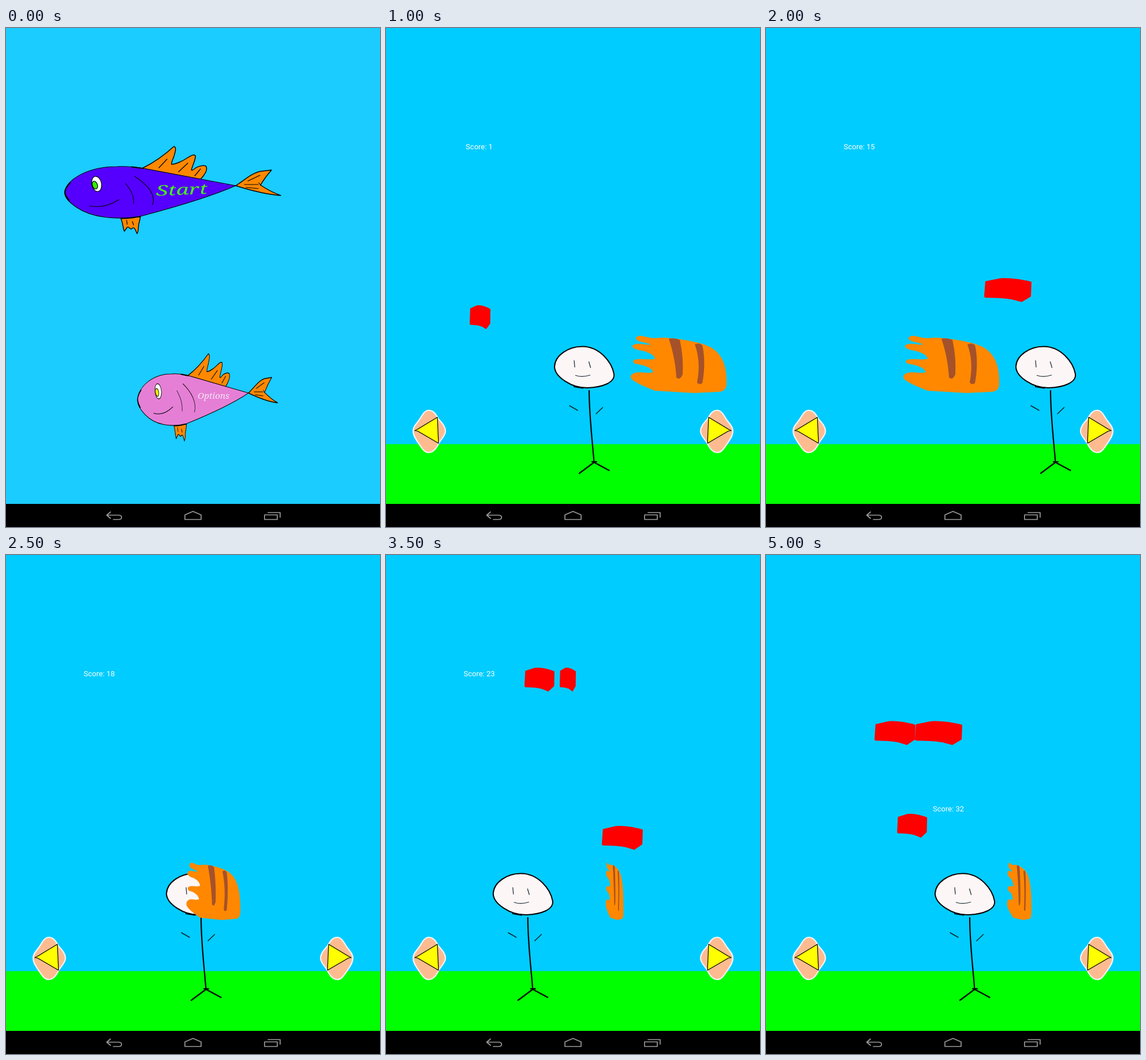
These frames come from a looping animation (648 px wide and 864 px high, 5.5 s). An HTML page with a canvas:

```html
<!DOCTYPE html>
<html lang="en">
<head>
<meta charset="utf-8">
<title>Fish menu and catching game</title>
<style>
html, body { margin: 0; width: 100%; height: 100%; overflow: hidden; background: #000; }
canvas { display: block; width: 648px; height: 864px; }
</style>
</head>
<body>
<canvas id="stage" width="648" height="864"></canvas>
<script>
const ctx = document.getElementById('stage').getContext('2d');
const STEP = 500, STEPS = 11;

function fill(path, color) {
  ctx.fillStyle = color;
  ctx.fill(path);
}
function line(path, width, color = '#000') {
  ctx.lineWidth = width;
  ctx.strokeStyle = color;
  ctx.stroke(path);
}
function rect(x, y, w, h, color) {
  ctx.fillStyle = color;
  ctx.fillRect(x, y, w, h);
}
function disc(x, y, rx, ry, turn, color, edge) {
  const p = new Path2D();
  p.ellipse(x, y, rx, ry, turn, 0, Math.PI * 2);
  fill(p, color);
  if (edge) line(p, edge);
}
function place(dx, dy, draw, sx = 1) {
  ctx.save();
  ctx.translate(dx, dy);
  ctx.scale(sx, 1);
  draw();
  ctx.restore();
}
const shape = d => new Path2D(d);

// Values given on every second step of the game, halfway between on the others
function track(keys, step) {
  const p = (step - 2) / 2, i = Math.floor(p);
  const a = keys[i], b = keys[Math.min(i + 1, keys.length - 1)];
  return a + (b - a) * (p - i);
}

// ---- Navigation bar ----
const navIcons = shape('M181 838L174.500 843.500L181 849M175 843.500H195C202 843.500 202 851 195 851H186' +
  'M310 851V843L324 837L338 843V851Z' +
  'M448 843H470V851H448ZM454 839H475V847');

function navBar() {
  rect(0, 824, 648, 40, '#000');
  line(navIcons, 1.7, '#999');
}

// ---- Menu ----
const fishParts = {
  body: shape('M102 285C104 262 142 240 192 240C208 239 226 241 238 243L398 273C350 294 290 311 233 326C190 333 148 328 123 311C108 301 101 293 102 285Z'),
  dorsal: shape('M236 243C258 232 278 217 291 205C296 207 293 215 291 222C289 228 286 233 287 236C293 236 305 231 314 225C320 221 326 218 328 221C329 227 324 236 322 243C320 248 323 247 329 242C336 238 345 237 347 240C349 246 346 250 342 256L337 262Z'),
  belly: shape('M199 330C203 338 202 345 205 352L210 345C213 343 215 349 217 348C220 345 222 345 224 349L227 356C231 350 228 343 231 336L233 326C222 329 210 330 199 330Z'),
  tail: shape('M398 273C415 262 428 250 442 248L460 246C452 255 445 265 441 272C453 280 465 286 476 290C450 288 420 280 398 273Z'),
  marks: shape('M279 227L265 242M315 234L299 249M337 244L327 256M209 333L210 340M219 335L221 341M419 265L440 255M413 271H437M416 276L437 278M441 272L438 268'),
  face: shape('M145 308C165 312 182 306 196 297M207 269C217 282 222 290 221 304M223 257C247 272 260 290 254 306'),
  lips: shape('M111 268C105 274 102 280 102 285C103 290 105 294 109 298M218 240.500L237 243')
};

function fish(color, pupil) {
  const f = fishParts;
  for (const part of [f.dorsal, f.belly, f.tail]) {
    fill(part, '#ff8800');
    line(part, 1.4);
  }
  fill(f.body, color);
  line(f.body, 1.1);
  line(f.marks, 1.2);
  line(f.face, 1.1);
  line(f.lips, 2.2);
  disc(157, 270, 8.5, 13.3, -0.2, '#fff', 1.2);
  disc(154, 272, 4.4, 7, -0.35, pupil, 1.2);
}

function label(text, x, y, size, color, turn, sx) {
  ctx.save();
  ctx.translate(x, y);
  ctx.rotate(turn);
  ctx.scale(sx, 1);
  ctx.font = `italic ${size}px "Noto Serif", serif`;
  ctx.textAlign = 'left';
  ctx.fillStyle = color;
  ctx.fillText(text, 0, 0);
  ctx.restore();
}

const speaker = shape('M155 98H158L164 92.500V110L158 105H155Z');
const waves = shape('M166 98Q168.500 101.500 166 105M168.500 96.500Q172 101.500 168.500 106.500M171 95.500Q175 101.500 171 107.500');
const mixer = shape('M474 95.500H495M474 102H495M474 108.500H495');

function volumePanel() {
  ctx.save();
  ctx.shadowColor = 'rgba(0,0,0,.65)';
  ctx.shadowBlur = 7;
  ctx.shadowOffsetY = 2;
  rect(136, 74.500, 375, 53.500, '#282828');
  ctx.restore();
  fill(speaker, '#f2f2f2');
  line(waves, 1.1, '#ddd');
  rect(308, 100.500, 121, 1, '#3c3c3c');
  rect(203, 99.500, 105, 3, '#33b5e5');
  disc(308.500, 101, 12.5, 12.5, 0, 'rgba(51,181,229,.62)');
  disc(308.500, 101, 4.3, 4.3, 0, '#33b5e5');
  rect(456.500, 88, 1, 27, '#484848');
  line(mixer, 1.5, '#aaa');
  for (const [x, y] of [[487, 92], [477, 98.500], [485, 105]]) {
    rect(x - 1, y, 5, 7, '#282828');
    rect(x, y, 3, 7, '#bbb');
  }
}

function menu(step) {
  rect(0, 0, 648, 824, '#1accff');
  place(180 * step, 123 * step, () => {
    fish('#5500ff', '#33ee00');
    label('Start', 260, 290.500, 25, '#44ff11', -0.04, 1.54);
  });
  place(178 * step, -398 * step, () => {
    place(228 - 102 * 0.649, 359, () => fish('#e57fd5', '#eeee00'), 0.649);
    label('Options', 332, 641.500, 15.2, '#f3e6f3', 0, 1);
  });
  if (step === 1) volumePanel();
}

// ---- Game ----
const pad = shape('M74 662C82 662 86 668 91 677C97 684 103 690 103 698C103 706 96 711 92 718C87 728 82 735 74 735C66 735 62 727 57 720C52 712 47 706 47 698C47 690 53 685 58 678C63 670 67 662 74 662Z');
const arrow = shape('M50 697L55 694.500L89 674L91 719L55 698Z');

function button() {
  fill(pad, '#ffbb90');
  line(pad, 2.2, '#f4f4f4');
  fill(arrow, '#ffff00');
  line(arrow, 1.2);
}

const head = shape('M292 586C293 567 316 551 341 551.500C370 552 391 578 395 599C397 614 375 622 350 623C322 624 292 604 292 586Z');
const chin = shape('M326 621L341 623.500');
const features = shape('M326 576L327 587M351.500 578L354.500 588M328.500 601.500Q340 605.500 353.500 601');
const arms = shape('M318 654L332 662M375.500 657L364 668');
const torso = shape('M352 628C352 670 357 710 360.500 752L335 771M360.500 752L386.500 766M357 751L365 751');

function player() {
  fill(head, '#fcf6f7');
  line(head, 2);
  line(chin, 2.2);
  line(features, 1.3, '#233038');
  line(arms, 1.5, '#07242c');
  line(torso, 2.2);
}

// Paw and brick live in boxes that are stretched sideways
const paw = shape('M10 6C10 1 17 0 24 2C31 4 37 5 43 5C57 3 72 5 87 7C100 9 112 11 122 14C137 18 150 25 158 39C164 49 167 62 167 80C168 91 164 98 152 98L110 100L43 96C30 91 16 85 8 80C-1 75 -1 69 6 66C16 62 28 67 40 64C38 57 26 52 13 50C4 49 3 44 9 42C19 40 31 43 43 41C42 34 33 30 22 27C9 25 1 21 5 17C12 12 24 17 36 16C28 12 12 12 10 6Z');
const stripes = shape('M67 6Q77 4 86 8C91 30 92 50 91 68Q86 79 80 73C79 50 74 27 67 6Z' +
  'M112 16Q119 12 125 17C130 37 129 64 125 83Q118 87 116 81C121 58 119 34 112 16Z');

function drawPaw(x, w) {
  place(x, 532, () => {
    fill(paw, '#ff8800');
    fill(stripes, '#a5512a');
  }, w / 167);
}

const brick = shape('M2 5.500L27 .500Q32 -.500 52 1Q70 3 82 6.500L81 32L65 41.500L48 37Q32 34 3 34Q0 34 0 31Z');

// First and last step, then position on the first one, width, travel per step
const bricks = [
  { from: 2, to: 2, x: 145, y: 480, w: 36 },
  { from: 3, to: 4, x: 378, y: 195, w: 82, vy: 238 },
  { from: 6, to: 6, x: 346, y: 247, w: 18 },
  { from: 7, to: 8, x: 374, y: 469, w: 71, vy: 102.5 },
  { from: 7, to: 7, x: 240, y: 195, w: 52 },
  { from: 7, to: 7, x: 301, y: 195, w: 28 },
  { from: 8, to: 10, x: 240, y: 243, w: 52, vx: -6.4, vy: 102.5 },
  { from: 8, to: 8, x: 301, y: 243, w: 28 },
  { from: 9, to: 10, x: 188, y: 186, w: 71, vy: 101.5 },
  { from: 9, to: 10, x: 258, y: 186, w: 82, vy: 101.5 }
];

function drawBricks(step) {
  for (const { from, to, x, y, w, vx = 0, vy = 0 } of bricks) {
    if (step < from || step > to) continue;
    const n = step - from;
    place(x + vx * n, y + vy * n, () => fill(brick, '#ff0000'), w / 82);
  }
}

function game(step) {
  rect(0, 0, 648, 721, '#00ccff');
  rect(0, 720.500, 648, 103.500, '#00ff00');
  button();
  place(648, 0, button, -1);
  place(track([0, 141, -169, -43.5, 1], step), 0, player);
  drawPaw(track([423, 237, 387, 374, 417.5], step), track([167, 167, 21, 41, 42.5], step));
  drawBricks(step);
  const score = Math.round(track([1, 15, 21, 25, 32], step));
  const moved = step >= 8;
  ctx.font = '13px Roboto, sans-serif';
  ctx.textAlign = 'center';
  ctx.fillStyle = '#fff';
  ctx.fillText('Score: ' + score, moved ? 316 : 161.5, moved ? 444 : 210);
}

ctx.lineCap = ctx.lineJoin = 'round';
const start = performance.now();

function frame(now) {
  const step = Math.floor(Math.max(0, now - start) / STEP) % STEPS;
  if (step < 2) menu(step);
  else game(step);
  navBar();
  requestAnimationFrame(frame);
}
frame(start);
</script>
</body>
</html>
```
